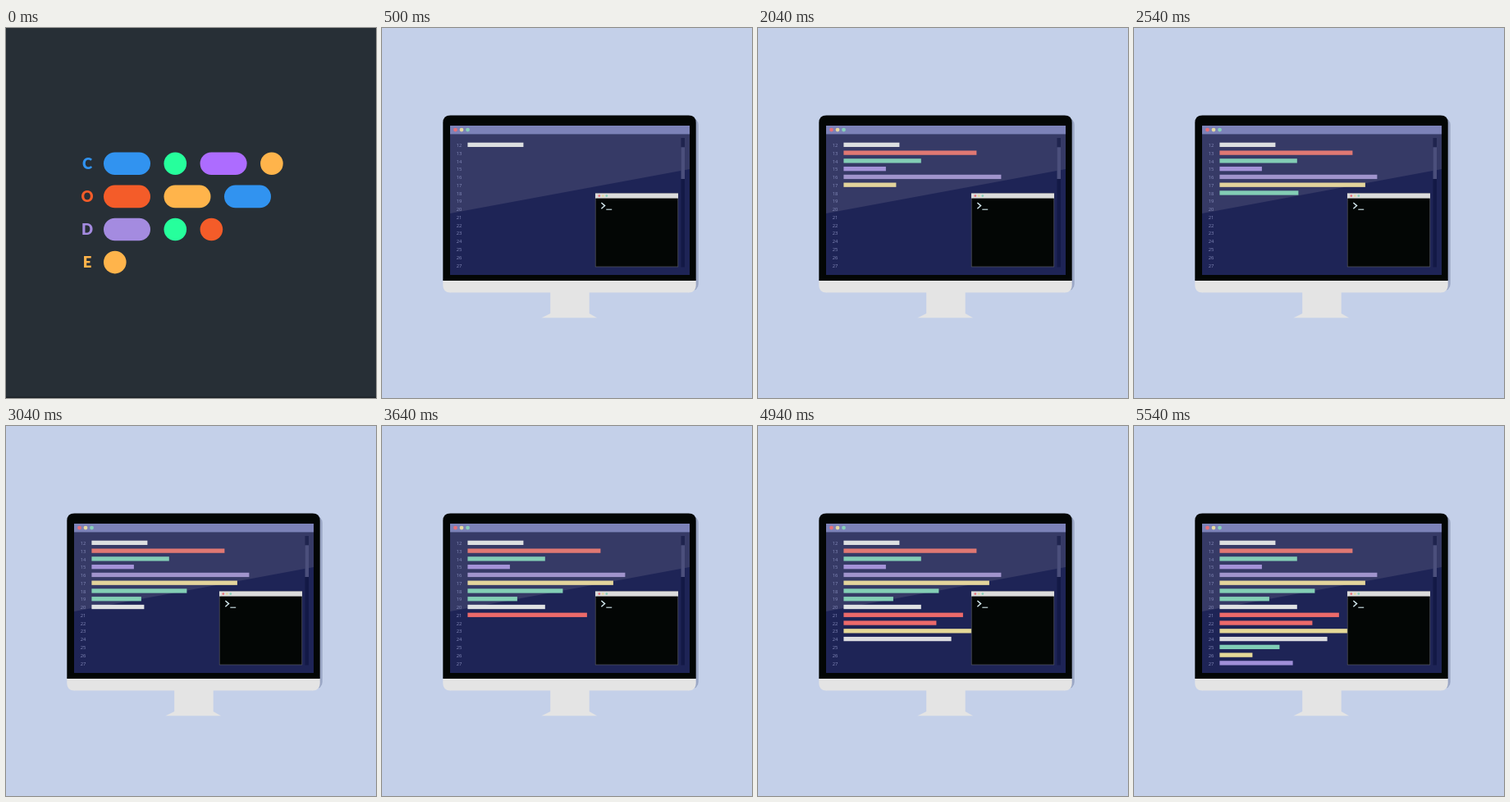
These frames come from a looping animation (451 by 451 pixels, 5.64 s). An HTML page:

```html
<!DOCTYPE html>
<html lang="en">
<head>
<meta charset="utf-8">
<title>Code</title>
<style>
  html, body { margin: 0; width: 100%; height: 100%; overflow: hidden; }
  svg { display: block; width: 100%; height: 100%; }
  #letters { font: 900 18.5px Lato, Montserrat, sans-serif; text-anchor: middle; }
  #numbers { font: 5.8px "Open Sans", sans-serif; text-anchor: end; fill: #858bba; }
</style>
</head>
<body>
<svg viewBox="0 0 451 451">
  <g id="title">
    <rect width="451" height="451" fill="#272f36"/>
    <rect y="449.6" width="451" height="1.4" fill="#1c2227"/>
    <g id="pills"></g>
    <g id="letters"></g>
  </g>
  <g id="desk">
    <rect width="451" height="451" fill="#c4d0e9"/>
    <rect x="90" y="109" width="295.7" height="212" rx="9" fill="#9ba7c5"/>
    <path d="M74.3 308V115.5q0-9 9-9H373.7q9 0 9 9V308Z" fill="#030605"/>
    <path d="M74.3 308H382.7V313.5q0 9-9 9H83.3q-9 0-9-9Z" fill="#e4e4e4"/>
    <path d="M205.2 322H252.7V348L262 353.2H194.5L205.2 348Z" fill="#e4e4e4"/>
    <rect x="83" y="119" width="292" height="182" fill="#1e2456"/>
    <path d="M83 129H375V172L83 226Z" fill="#363a66"/>
    <rect x="83" y="119" width="292" height="10.4" fill="#7c82b8"/>
    <g id="windowDots"></g>
    <rect x="364.5" y="134" width="4.5" height="157.5" fill="#090e36" opacity=".5"/>
    <rect x="364.5" y="145.3" width="4.5" height="38.7" fill="#4b4f7c"/>
    <g id="numbers"></g>
    <g id="bars"></g>
    <rect x="260.2" y="201.8" width="100.6" height="89.2" fill="#030605" stroke="#55585f" stroke-width=".7"/>
    <rect x="260" y="201.5" width="101" height="6.1" fill="#dcdcdc"/>
    <g id="terminalDots"></g>
    <path d="M267.4 213L271.6 216.6L267.4 220.2" fill="none" stroke="#d3e8ee" stroke-width="1.4"/>
    <path d="M273.3 221.2H280.2" stroke="#d3e8ee" stroke-width="1.1"/>
  </g>
</svg>
<script>
const LOOP = 5640, TITLE_END = 500;
const byId = id => document.getElementById(id);

function add(parent, tag, attrs, text) {
  const node = document.createElementNS("http://www.w3.org/2000/svg", tag);
  for (const key in attrs) node.setAttribute(key, attrs[key]);
  if (text) node.textContent = text;
  return byId(parent).appendChild(node);
}

const BLUE = "#3193f0", GREEN = "#26ff9c", VIOLET = "#ad6cff",
      AMBER = "#ffb44b", ORANGE = "#f45c29", LILAC = "#a48be0";
const DOT = 27.6, PILL = 57, GAP = 16.5;

// Each row: letter, its colour, then [width, colour] shapes.
[
  ["C", BLUE, [PILL, BLUE], [DOT, GREEN], [PILL, VIOLET], [DOT, AMBER]],
  ["O", ORANGE, [PILL, ORANGE], [PILL, AMBER], [PILL, BLUE]],
  ["D", LILAC, [PILL, LILAC], [DOT, GREEN], [DOT, ORANGE]],
  ["E", AMBER, [DOT, AMBER]]
].forEach(([letter, color, ...shapes], row) => {
  const y = 165.3 + row * 40.1;
  add("letters", "text", { x: 99, y: y + 6.7, fill: color }, letter);
  let x = 119;
  for (const [width, fill] of shapes) {
    add("pills", "rect", { x, y: y - DOT / 2, width, height: DOT, rx: DOT / 2, fill });
    x += width + GAP;
  }
});

function addDots(parent, x, y, gap, r) {
  ["#e8707a", "#e5d9a0", "#87d0ba"].forEach((fill, i) =>
    add(parent, "circle", { cx: x + i * gap, cy: y, r, fill }));
}
addDots("windowDots", 89.5, 124.1, 7.5, 2.4);
addDots("terminalDots", 264.8, 204.6, 4.5, 1.35);

// Code lines: colour, full width, first tick, growth per tick.
const lines = [
  ["#dcdee0", 68, 0, 68],
  ["#e07873", 162, 1, 20],
  ["#83cdb5", 94.4, 10, 20],
  ["#a493d8", 51.5, 15, 20],
  ["#a094cc", 192, 18, 21.4],
  ["#e3d49c", 177.5, 27, 32],
  ["#83ceb5", 116, 33, 32],
  ["#83ceb5", 60.5, 37, 32],
  ["#dfe1e3", 94.4, 39, 32],
  ["#ec6a6a", 145.5, 42, 32],
  ["#ec6a6a", 113, 47, 32],
  ["#e5d998", 161, 51, 30.5],
  ["#dcdde1", 131.2, 56, 33],
  ["#80ceb6", 73, 60, 36.5],
  ["#e5d998", 40, 62, 40],
  ["#a08fd8", 89.2, 63, 31]
].map(([fill, full, start, step], i) => {
  const y = 142.4 + i * 9.77;
  add("numbers", "text", { x: 97.3, y: y + 2.6 }, String(12 + i));
  const bar = add("bars", "rect", { x: 104.4, y: y - 2.7, height: 5.3, fill });
  return { bar, full, start, step };
});

// Typing runs on an uneven clock: [tick length in ms, tick count].
const tempo = [[50, 9], [60, 11], [50, 5], [60, 8], [100, 32]];

function tickAt(ms) {
  let tick = 0;
  for (const [length, count] of tempo) {
    if (ms < length * count) return tick + Math.floor(ms / length);
    ms -= length * count;
    tick += count;
  }
  return tick;
}

function draw(ms) {
  const typing = ms >= TITLE_END;
  byId("title").style.display = typing ? "none" : "";
  byId("desk").style.display = typing ? "" : "none";
  if (!typing) return;
  const tick = tickAt(ms - TITLE_END);
  for (const { bar, full, start, step } of lines) {
    const width = Math.min(full, step * (tick - start + 1));
    bar.setAttribute("width", Math.max(0, width));
  }
}

const origin = performance.now();
function frame() {
  draw((performance.now() - origin) % LOOP);
  requestAnimationFrame(frame);
}
frame();
</script>
</body>
</html>
```
